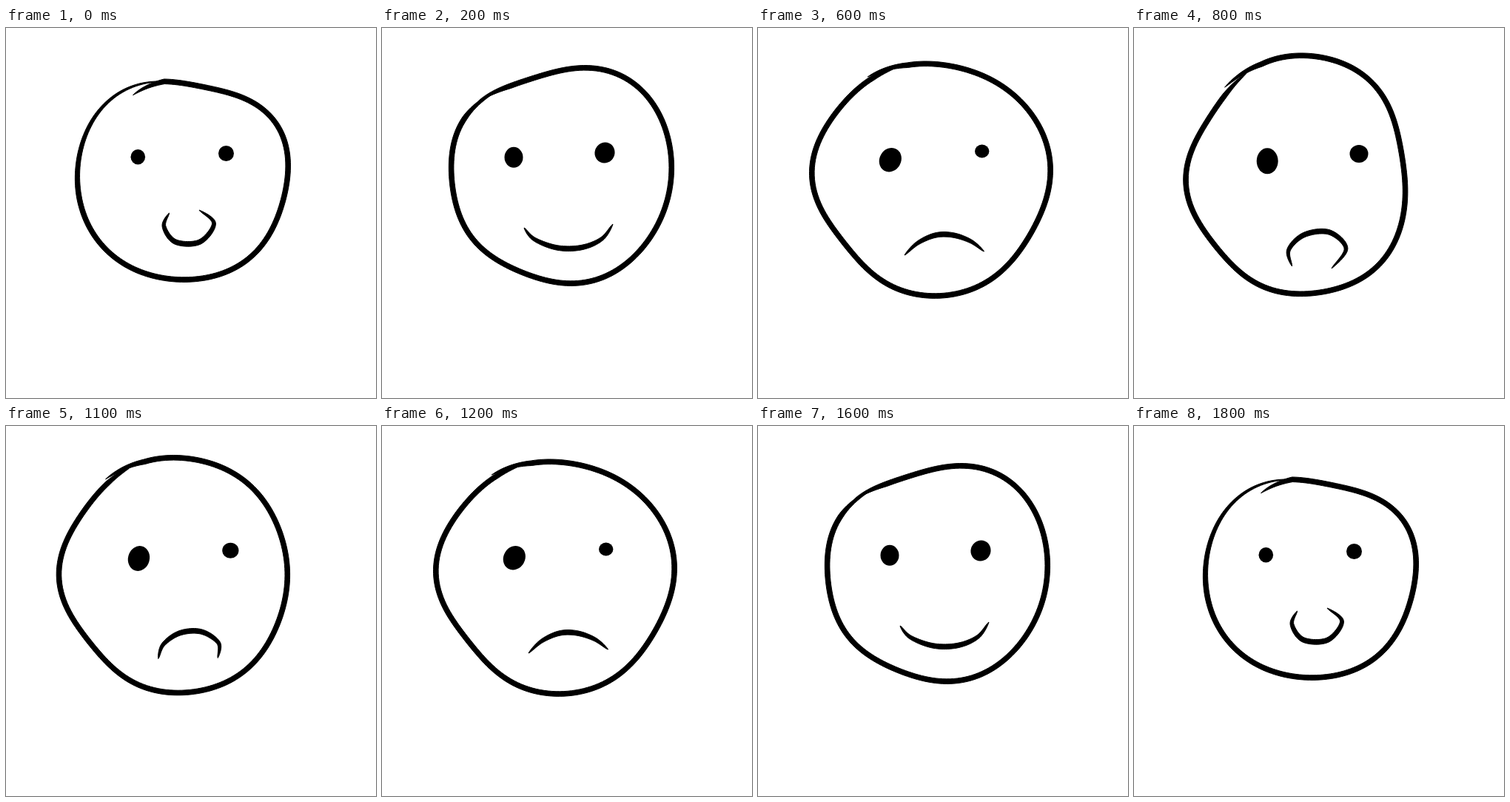
These frames come from a looping animation (500 by 500 pixels, 2 s). An HTML page:

```html
<!DOCTYPE html>
<html lang="en">
<head>
<meta charset="utf-8">
<title>Changing mood</title>
<style>
  html, body { margin: 0; width: 100%; height: 100%; overflow: hidden; background: #fff; }
  svg { display: block; width: 100%; height: 100%; }
</style>
</head>
<body>
<svg viewBox="0 0 500 500">
  <g fill="#000">
    <path id="head" stroke="#000" stroke-linejoin="round"/>
    <path id="mouth" stroke="#000" stroke-linejoin="round"/>
    <ellipse id="left"/>
    <ellipse id="right"/>
  </g>
</svg>
<script>
const LOOP = 2000, BEAT = 100, PEN = 7.6, LEAD = 20, CX = 235, CY = 205;

// head:  radii every 30 degrees, clockwise from the right
// pen:   start angle, start offset from the ring, overlap and taper in degrees
// eyes:  cx, cy, rx, ry, tilt
const calm = {
  head: [145, 141.5, 140, 135, 136, 138, 138.5, 142, 142, 131, 135, 150.5],
  pen: [241, -11, 21, 90],
  mouth: [[220.5, 250], [213.5, 268], [229, 289], [262, 289], [281, 264], [261, 246]],
  left: [178.3, 174.3, 9.8, 10.3, 0],
  right: [297.5, 169.5, 10.5, 10.5, 0]
};
const happy = {
  head: [155.5, 149.5, 147, 138.5, 133.5, 138.5, 140.7, 148.5, 142, 146, 165, 164.5],
  pen: [224, 2, 10, 20],
  mouth: [[192, 270], [206, 285.5], [237, 297], [270, 296.5], [297, 285], [312, 265]],
  left: [178, 174.8, 12.5, 14, 0],
  right: [301, 168.5, 13.4, 14.2, 25]
};
const sad = {
  head: [159.5, 152, 156.5, 157, 151, 147.5, 161.8, 159, 159, 156.5, 157, 161.5],
  pen: [238, 5, 14, 12],
  mouth: [[198, 307], [216, 290.5], [240, 280], [264, 280], [288, 288.5], [305.5, 302]],
  left: [178.8, 178.2, 14.5, 16.7, 30],
  right: [302.7, 166.5, 9.7, 9, 0]
};
const upset = {
  head: [131, 141.7, 151.5, 154, 156, 155, 165, 157.5, 166, 167.5, 159, 138],
  pen: [228, 7, 12, 15],
  mouth: [[213.5, 322], [209, 300], [230, 279.5], [264, 276], [286.5, 298], [267, 325]],
  left: [180.2, 179.8, 14.5, 17.5, 0],
  right: [304, 170, 12.5, 12, 0]
};
const keys = [[0, calm], [2, happy], [6, sad], [8, upset]];

const rad = deg => deg * Math.PI / 180;
const mix = (a, b, k) => Array.isArray(a) ? a.map((v, i) => mix(v, b[i], k)) : a + (b - a) * k;

// Smooth periodic curve through evenly spaced radii
function ring(radii, deg) {
  const n = radii.length;
  return radii.reduce((sum, r, i) => {
    const x = rad(deg - i * 360 / n);
    const near = Math.abs(Math.sin(x / 2)) < 1e-6;
    return sum + r * (near ? 1 : Math.sin(n * x / 2) / (n * Math.tan(x / 2)));
  }, 0);
}

function headLine(radii, [start, offset, overlap, taper]) {
  const sweep = 360 + overlap, line = [];
  for (let turn = 0; turn <= sweep; turn += 2) {
    const a = start + turn, lead = Math.min(1, turn / LEAD);
    const r = ring(radii, a) + offset * (1 - lead);
    const fade = Math.min(1, (sweep - turn) / taper);
    line.push([CX + r * Math.cos(rad(a)), CY + r * Math.sin(rad(a)), PEN * Math.sqrt(lead * fade)]);
  }
  return line;
}

// Catmull-Rom through the points, widest in the middle
function mouthLine(pts) {
  const last = pts.length - 1, fine = 12, line = [];
  const at = i => pts[Math.max(0, Math.min(last, i))];
  for (let s = 0; s <= last * fine; s++) {
    const i = Math.min(last - 1, Math.floor(s / fine)), t = s / fine - i;
    const [a, b, c, d] = [at(i - 1), at(i), at(i + 1), at(i + 2)];
    const [x, y] = b.map((p, k) => p + 0.5 * t * (c[k] - a[k] +
      t * (2 * a[k] - 5 * p + 4 * c[k] - d[k] + t * (3 * (p - c[k]) + d[k] - a[k]))));
    const swell = Math.max(0, Math.sin(Math.PI * s / (last * fine)));
    line.push([x, y, PEN * Math.sqrt(swell)]);
  }
  return line;
}

// Ribbon of varying width; its 1px stroke rounds the ends
function brush(line) {
  const one = [], two = [];
  line.forEach(([x, y, w], i) => {
    const p = line[Math.max(0, i - 1)], q = line[Math.min(line.length - 1, i + 1)];
    const dx = q[0] - p[0], dy = q[1] - p[1];
    const r = Math.max(0, w - 1) / 2 / (Math.hypot(dx, dy) || 1);
    one.push([x - dy * r, y + dx * r]);
    two.push([x + dy * r, y - dx * r]);
  });
  const pts = one.concat(two.reverse());
  return "M" + pts.map(p => p[0].toFixed(2) + " " + p[1].toFixed(2)).join("L") + "Z";
}

function set(id, attrs) {
  const el = document.getElementById(id);
  for (const name in attrs) el.setAttribute(name, attrs[name]);
}

function draw(step) {
  const i = Math.max(1, keys.findIndex(key => key[0] >= step));
  const [t0, from] = keys[i - 1], [t1, to] = keys[i];
  const part = name => mix(from[name], to[name], (step - t0) / (t1 - t0));
  set("head", { d: brush(headLine(part("head"), part("pen"))) });
  set("mouth", { d: brush(mouthLine(part("mouth"))) });
  for (const eye of ["left", "right"]) {
    const [cx, cy, rx, ry, tilt] = part(eye);
    set(eye, { cx, cy, rx, ry, transform: `rotate(${tilt} ${cx} ${cy})` });
  }
}

// Out in eight steps, hold, then back again
function stepAt(ms) {
  const beat = Math.floor(ms % LOOP / BEAT);
  return beat < 11 ? Math.min(beat, 8) : Math.max(0, 18 - beat);
}

const start = performance.now();
let shown = -1;
function tick() {
  const step = stepAt(performance.now() - start);
  if (step !== shown) draw(shown = step);
  requestAnimationFrame(tick);
}
tick();
</script>
</body>
</html>
```
